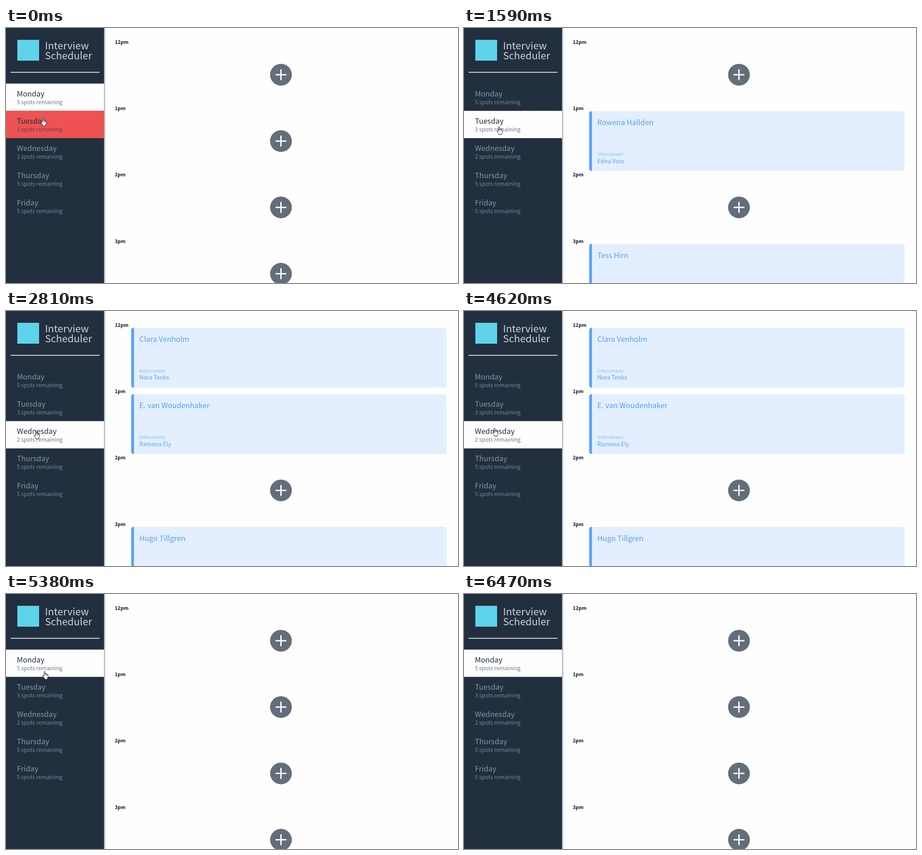
These frames come from a looping animation (997 by 562 pixels, 7.66 s). An HTML page with a canvas:

```html
<!DOCTYPE html>
<html lang="en">
<head>
<meta charset="utf-8">
<title>Interview Scheduler</title>
<style>
  html, body { margin: 0; width: 100%; height: 100%; overflow: hidden; background: #fefefe; }
  canvas { display: block; }
</style>
</head>
<body>
<canvas id="stage" width="997" height="562"></canvas>
<script>
const ctx = document.getElementById('stage').getContext('2d');
const W = 997, H = 562, LOOP = 7660;
const FAMILY = '"Noto Sans CJK JP", "Noto Sans CJK SC", "Noto Sans CJK", "Open Sans", sans-serif';
const WHITE = '#fefefe', NAVY = '#222f3e', RED = '#ee5253', BLUE = '#54a0ff', PALE = '#e3effe', GREY = '#636e7a';

const SIDEBAR = 216.3, ROW_TOP = 122.5, ROW = 60.1, SLOT = 146.2;
const days = [['Monday', 5], ['Tuesday', 3], ['Wednesday', 2], ['Thursday', 5], ['Friday', 5]];
const hours = ['12pm', '1pm', '2pm', '3pm'];

// Bookings per day, one entry per hour: [student, interviewer]
const bookings = [
  [],
  [null, ['Rowena Hallden', 'Edna Voss'], null, ['Tess Hirn', '']],
  [['Clara Venholm', 'Nora Tenks'], ['E. van Woudenhaker', 'Ramona Ely'], null, ['Hugo Tillgren', '']]
];

const clicks = [{ time: 0, day: 0 }, { time: 630, day: 1 }, { time: 2810, day: 2 }, { time: 5380, day: 0 }];

// The hand rests between glides; each glide moves in equal ticks
const glides = [
  { start: 1335, tick: 125, steps: 7, power: 1, from: [76, 198], to: [61, 264] },
  { start: 4495, tick: 125, steps: 5, power: 1.7, from: [61, 264], to: [80, 170] },
  { start: 5530, tick: 130, steps: 6, power: 3.2, from: [80, 170], to: [141, 539] }
];
const HAND_GONE = 6470;

const hand = new Path2D('M4 11V1.7a1.2 1.2 0 0 1 2.4 0V6.2a1.1 1.1 0 0 1 2.2.3a1.1 1.1 0 0 1 2.1.5' +
  'a1.1 1.1 0 0 1 2 .6V12q0 2-1.5 3.8V18H5V16.2Q2.5 13 .8 10.6Q.3 9.3 1.4 9Q2.6 8.8 4 11Z');
const knuckles = new Path2D('M6.4 6.2V9.5M8.6 6.5V9.5M10.7 7V9.8');

function handAt(t) {
  const g = glides.findLast(glide => t >= glide.start) || glides[0];
  const step = Math.floor((t - g.start) / g.tick);
  const p = Math.min(Math.max(step / g.steps, 0), 1) ** g.power;
  return g.from.map((v, i) => Math.round(v + (g.to[i] - v) * p));
}

function rect(x, y, w, h, color) {
  ctx.fillStyle = color;
  ctx.fillRect(x, y, w, h);
}

function text(str, x, y, size, color, weight = 400) {
  ctx.font = `${weight} ${size}px ${FAMILY}`;
  ctx.fillStyle = color;
  ctx.fillText(str, x, y);
}

function drawRow(i, selected, hovered) {
  const [name, spots] = days[i];
  const y = ROW_TOP + i * ROW;
  let nameColor = '#8395a7', spotColor = '#74869a';
  if (selected || hovered) {
    rect(0, y, SIDEBAR, ROW, selected ? WHITE : RED);
    nameColor = NAVY;
    spotColor = selected ? '#6f7984' : '#7a3b43';
  }
  text(name, 24, y + 28, 16.3, nameColor);
  text(spots + ' spots remaining', 24, y + 45.4, 12.2, spotColor, 300);
}

function drawSidebar(day, hover) {
  const shadow = ctx.createLinearGradient(SIDEBAR, 0, SIDEBAR + 4, 0);
  shadow.addColorStop(0, 'rgba(34,47,62,.4)');
  shadow.addColorStop(1, 'rgba(34,47,62,0)');
  rect(SIDEBAR, 0, 4, H, shadow);
  rect(0, 0, SIDEBAR, H, NAVY);
  rect(25, 26, 48, 46, '#5fd3ea');
  text('Interview', 86, 47, 22, '#cdd2d7', 300);
  text('Scheduler', 86, 69, 22, '#cdd2d7', 300);
  rect(10, 96.8, 196.5, 1.6, WHITE);
  days.forEach((_, i) => drawRow(i, i === day, i === hover));
}

function drawAdd(y) {
  ctx.fillStyle = GREY;
  ctx.beginPath();
  ctx.arc(606.5, y, 24, 0, Math.PI * 2);
  ctx.fill();
  rect(594.5, y - 1.5, 24, 3, WHITE);
  rect(605, y - 12, 3, 24, WHITE);
}

function drawCard(y, [student, interviewer]) {
  ctx.save();
  ctx.beginPath();
  ctx.roundRect(276.3, y, 695.7, 132, 5);
  ctx.clip();
  rect(276, y, 696, 132, PALE);
  rect(276, y, 6.2, 132, BLUE);
  ctx.restore();
  text(student, 294, y + 31, 16.3, BLUE);
  text('Interviewer', 294, y + 99.2, 10.9, '#8fbefc', 300);
  text(interviewer, 294, y + 114.4, 12.7, BLUE);
}

function drawSchedule(day) {
  hours.forEach((hour, i) => {
    const y = i * SLOT;
    const booking = bookings[day][i];
    text(hour, 240, y + 35, 10.8, '#111820', 600);
    if (booking) drawCard(y + 37, booking);
    else drawAdd(y + 103);
  });
}

function drawHand(x, y) {
  ctx.save();
  ctx.translate(x, y);
  ctx.fillStyle = '#fff';
  ctx.strokeStyle = '#15191f';
  ctx.lineWidth = 1;
  ctx.fill(hand);
  ctx.stroke(hand);
  ctx.lineWidth = .8;
  ctx.stroke(knuckles);
  ctx.restore();
}

function frame() {
  const t = performance.now() % LOOP;
  const { day } = clicks.findLast(click => t >= click.time);
  const visible = t < HAND_GONE;
  const [x, y] = handAt(t);
  const hover = visible ? Math.floor((y - ROW_TOP) / ROW) : -1;
  rect(0, 0, W, H, WHITE);
  drawSchedule(day);
  drawSidebar(day, hover);
  if (visible) drawHand(x, y);
  requestAnimationFrame(frame);
}
frame();
</script>
</body>
</html>
```
